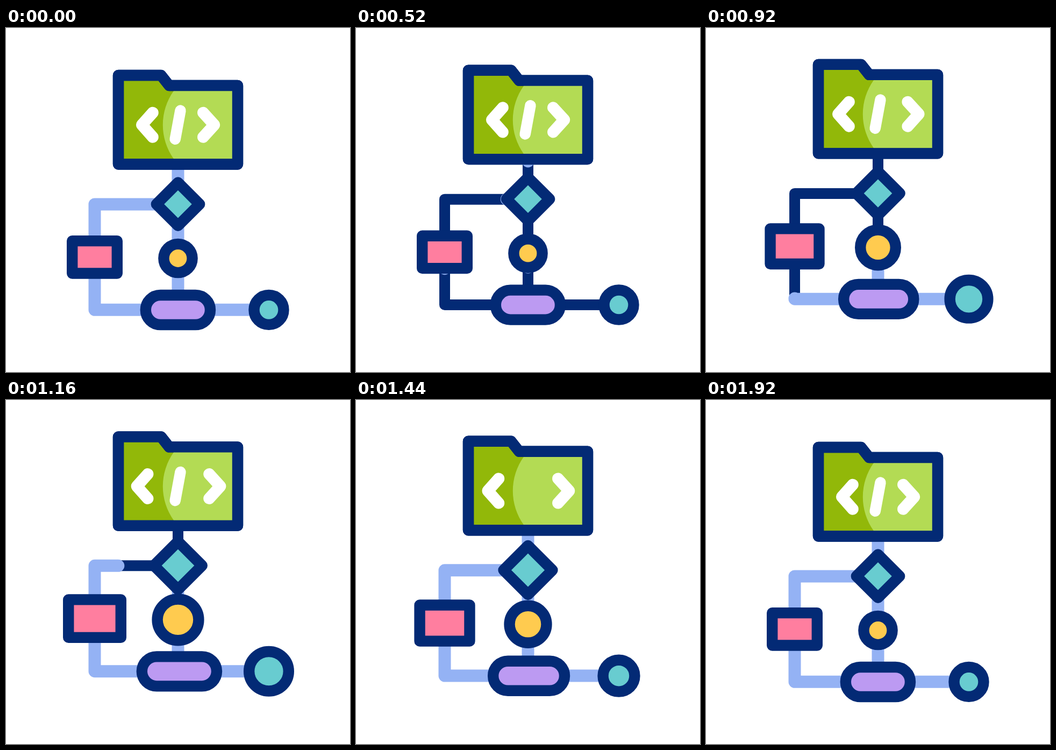
Animation of 640 by 640 pixels, one loop 2 s. Source, as an HTML page with a canvas:

```html
<!DOCTYPE html>
<html>
<head>
<meta charset="utf-8">
<style>
html, body { margin: 0; height: 100%; overflow: hidden; background: #fff; }
canvas { display: block; }
</style>
</head>
<body>
<canvas id="stage" width="640" height="640"></canvas>
<script>
const ctx = document.getElementById('stage').getContext('2d');
const LOOP = 2000, NAVY = '#032a75', LIGHT = '#94b2f4';

// Connectors: points, then the time span in which the light line grows back
const links = [
  { pts: [[320, 254], [320, 290]], grow: [1280, 1420] },
  { pts: [[320, 360], [320, 400]], grow: [1000, 1296] },
  { pts: [[320, 450], [320, 500]], grow: [820, 1010] },
  { pts: [[300, 328], [165, 328], [165, 412]], grow: [1000, 1296] },
  { pts: [[165, 440], [165, 524.3], [270, 524.3]], grow: [820, 1010] },
  { pts: [[360, 524.3], [475, 524.3]], grow: [640, 853] }
];

// Eased progress from 0 to 1 between two times
function ease(t, from, to, power = 2) {
  const p = Math.min(1, Math.max(0, (t - from) / (to - from)));
  return p < 0.5 ? (2 * p) ** power / 2 : 1 - (2 - 2 * p) ** power / 2;
}

const pulse = (t, a, b, c, d) => ease(t, a, b) - ease(t, c, d);

function line(pts, color, width, from = 0, to = 1) {
  if (to - from < 0.001) return;
  const length = pts.slice(1).reduce(
    (sum, [x, y], i) => sum + Math.hypot(x - pts[i][0], y - pts[i][1]), 0);
  ctx.beginPath();
  pts.forEach(p => ctx.lineTo(...p));
  ctx.strokeStyle = color;
  ctx.lineWidth = width;
  if (from > 0 || to < 1) {
    ctx.setLineDash([(to - from) * length, 2 * length]);
    ctx.lineDashOffset = -from * length;
  }
  ctx.stroke();
  ctx.setLineDash([]);
}

function shape(path, fill) {
  ctx.fillStyle = fill;
  ctx.strokeStyle = NAVY;
  ctx.lineWidth = 20.4;
  ctx.fill(path);
  ctx.stroke(path);
}

function disc(x, y, r, fill) {
  const path = new Path2D();
  path.arc(x, y, r, 0, 2 * Math.PI);
  shape(path, fill);
}

function box(x, y, w, h, r, fill) {
  const path = new Path2D();
  path.roundRect(x, y, w, h, r);
  shape(path, fill);
}

const folder = new Path2D('M209 88H288.5L303.5 107H431V253.5H209Z');
const shine = new Path2D('M312 117A109 109 0 0 0 312 243.5H431V107H304Z');

function drawLinks(t) {
  const left = 1 - ease(t, 80, 640);
  for (const { pts, grow } of links) {
    line(pts, NAVY, 20);
    line(pts, LIGHT, 23, 0, left);
    line(pts, LIGHT, 23, 1 - ease(t, ...grow), 1);
  }
}

function drawFolder(t) {
  shape(folder, '#92b809');
  ctx.fillStyle = '#b3db54';
  ctx.fill(shine);
  ctx.stroke(folder);

  const spread = pulse(t, 560, 1120, 1280, 1800);
  const l = -9.3 * spread, r = 11.2 * spread;
  line([[273 + l, 157.5], [252.7 + l, 180.2], [273 + l, 203]], '#fff', 21.5);
  line([[366.8 + r, 157.5], [387.5 + r, 180.2], [366.8 + r, 203]], '#fff', 21.5);

  const slash = [[324.5, 153.6], [314.7, 206.8]];
  if (t < 1500) line(slash, '#fff', 20.5, ease(t, 1160, 1400), 1);
  else line(slash, '#fff', 20.5, 0, ease(t, 1620, 1900));
}

function drawNodes(t) {
  const swell = pulse(t, 680, 1150, 1254, 1712);

  const d = 40.2 + 5.5 * pulse(t, 820, 1300, 1360, 1920);
  const diamond = new Path2D(
    `M320 ${327.7 - d}L${320 + d} 327.7L320 ${327.7 + d}L${320 - d} 327.7Z`);
  shape(diamond, '#68ccd0');

  disc(320, 428.5, 26.6 + 11.8 * swell, '#ffcb4f');
  disc(489, 524.4, 27.5 + 9.6 * pulse(t, 550, 1080, 1100, 1600), '#68ccd0');

  const w = 83.6 * (1 + 0.167 * swell), h = 60.4 * (1 + 0.167 * swell);
  box(165 - w / 2, 426.3 - h / 2, w, h, 0, '#ff7e9f');
  box(259.8 - 7 * swell, 497, 120.2 + 19 * swell, 55, 27.5, '#bc9af2');
}

function frame(now) {
  const t = now % LOOP;
  const lift = 20.4 * (ease(t, 80, 1000) - ease(t, 1000, 1920, 2.5));
  ctx.fillStyle = '#fff';
  ctx.fillRect(0, 0, 640, 640);
  ctx.lineCap = ctx.lineJoin = 'round';
  ctx.save();
  ctx.translate(0, -lift);
  drawLinks(t);
  drawFolder(t);
  drawNodes(t);
  ctx.restore();
}

const start = performance.now();
function tick() {
  frame(performance.now() - start);
  requestAnimationFrame(tick);
}
tick();
</script>
</body>
</html>
```
